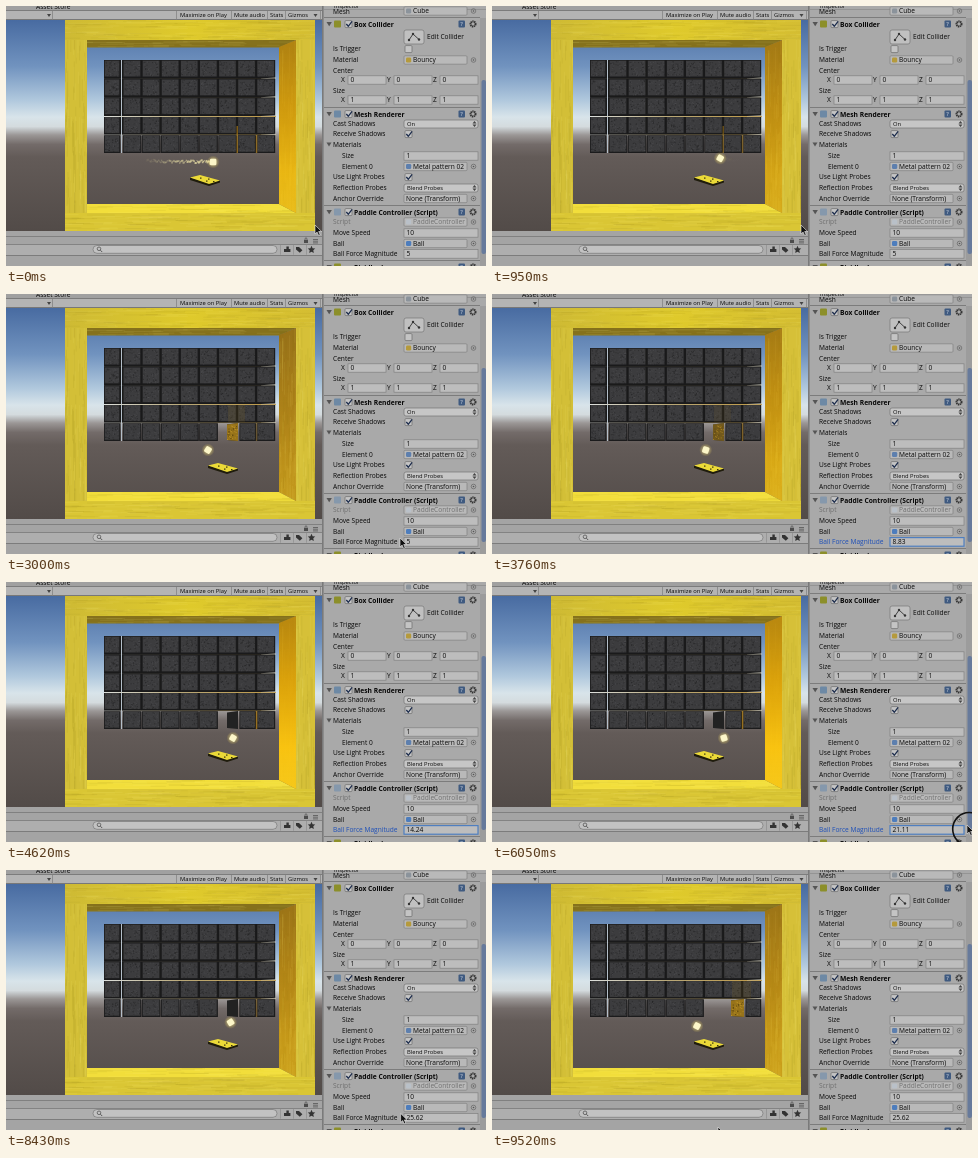
These frames come from a looping animation (480x260 px, 9.56 s). An HTML page with a canvas:

```html
<!DOCTYPE html>
<html lang="en">
<head>
<meta charset="utf-8">
<title>Brick game in the editor</title>
<style>
html, body { margin: 0; width: 100%; height: 100%; overflow: hidden; background: #a9a9a9; }
canvas, svg { position: absolute; left: 0; top: 0; width: 480px; height: 260px; }
text { font-family: "Open Sans", "Noto Sans", sans-serif; font-size: 6.6px; fill: #080808; white-space: pre; }
.bold { font-weight: 700; font-size: 6.7px; }
.bar { font-size: 5.8px; }
.dim { fill: #6f6f6f; }
.focus #label { fill: #1d4fb8; }
.focus #field { stroke: #4f7fc0; stroke-width: 1.2; }
</style>
</head>
<body>
<canvas id="game" width="480" height="260"></canvas>
<svg id="ui" viewBox="0 0 480 260"></svg>
<script>
const LOOP = 9560;
const ctx = document.getElementById('game').getContext('2d');
const ui = document.getElementById('ui');

let seed = 7;
const rnd = () => (seed = (seed * 16807) % 2147483647) / 2147483647;
const clamp = v => Math.max(0, Math.min(1, v));

// Linear value of column i in rows [time, ...values].
function track(keys, t, i = 1) {
  if (t <= keys[0][0]) return keys[0][i];
  for (let k = 1; k < keys.length; k++) {
    const a = keys[k - 1], b = keys[k];
    if (t <= b[0]) return a[i] + (b[i] - a[i]) * (t - a[0]) / (b[0] - a[0]);
  }
  return keys[keys.length - 1][i];
}

// ---- Motion ----
const BALL = [[-350, 140, 155], [0, 207, 156], [350, 262, 157], [800, 235, 153], [1200, 217, 151],
  [1500, 205, 158], [1860, 200, 156], [3000, 202, 156], [4620, 227, 156], [6050, 232, 156],
  [7570, 208, 156], [8300, 222, 153], [8700, 230, 151], [9100, 216, 157], [9520, 205, 156]];
const PADDLE = [[400, 199], [900, 217]];
const LIGHT = [[0, .8], [1860, .25], [3000, .2], [4620, 1], [6050, 1], [7570, .3], [9520, .35]];
const FORCE = [[3150, 5], [4620, 14.24], [6050, 21.11], [6900, 25.62]];
const CURSOR = [[2150, 309, 219], [2750, 394, 244], [3150, 394, 244], [3700, 484, 245], [5900, 484, 245],
  [6050, 475, 243], [7050, 465, 243], [7450, 250, 185], [8000, 250, 185], [8450, 401, 246],
  [9000, 300, 252], [9520, 226, 257]];
const HIT_1 = 1200, HIT_2 = 8700;

// ---- Game view ----
function poly(g, pts, fill) {
  g.beginPath();
  for (let i = 0; i < pts.length; i += 2) g.lineTo(pts[i], pts[i + 1]);
  g.closePath();
  g.fillStyle = fill;
  g.fill();
}

function layer(paint) {
  const c = document.createElement('canvas');
  c.width = 480;
  c.height = 260;
  paint(c.getContext('2d'));
  return c;
}

function blend(g, [x0, y0, x1, y1], stops) {
  const fill = g.createLinearGradient(x0, y0, x1, y1);
  stops.forEach(s => fill.addColorStop(...s));
  return fill;
}

function wood(g, pts, fill, upright) {
  g.save();
  poly(g, pts, fill);
  g.clip();
  const xs = pts.filter((v, i) => i % 2 === 0), ys = pts.filter((v, i) => i % 2);
  const x = Math.min(...xs), y = Math.min(...ys);
  const w = Math.max(...xs) - x, h = Math.max(...ys) - y;
  for (let i = 0; i < w * h / 35; i++) {
    g.fillStyle = rnd() < .5 ? 'rgba(120,95,0,.07)' : 'rgba(255,245,130,.09)';
    const len = 8 + rnd() * 32;
    g.fillRect(x + rnd() * w - (upright ? 0 : 10), y + rnd() * h - (upright ? 10 : 0),
      upright ? 1 : len, upright ? len : 1);
  }
  g.restore();
}

const INNER = [290, 34, 290, 207, 273, 198, 273, 41];
const scene = layer(g => {
  g.fillStyle = blend(g, [0, 14, 0, 225], [[0, '#486ba1'], [.22, '#7193bf'], [.38, '#b0c8dd'],
    [.46, '#d8e4ea'], [.505, '#d4dbde'], [.545, '#9b9796'], [.59, '#736b69'], [.65, '#635b58'], [1, '#524b48']]);
  g.fillRect(0, 14, 316, 211);
  wood(g, [78, 34, 290, 34, 273, 41.5, 81, 41.5], '#85711c');
  wood(g, INNER, blend(g, [0, 41, 0, 207], [[0, '#8f6c1c'], [.6, '#a57c1c'], [1, '#b88f1e']]), true);
  wood(g, [78, 207, 290, 207, 273, 198, 81, 198], '#f2de3b');
  wood(g, [59, 34, 81, 34, 81, 207, 59, 207], '#d3bf37', true);
  wood(g, [290, 34, 309, 34, 309, 207, 290, 207], '#d6c038', true);
  wood(g, [59, 14, 309, 14, 309, 34, 59, 34], blend(g, [59, 0, 309, 0],
    [[0, '#ceba34'], [.5, '#dfca2b'], [1, '#d4bd32']]));
  wood(g, [59, 207, 309, 207, 309, 225, 59, 225], '#dac634');
});

const glow = layer(g => poly(g, INNER, blend(g, [0, 41, 0, 207],
  [[0, 'rgba(205,150,10,.7)'], [.35, 'rgba(230,170,8,.85)'], [.75, 'rgba(252,198,16,.95)'], [1, 'rgba(252,205,25,.9)']])));

const colX = c => 98 + c * 19.1 - (c === 0 ? 0 : .3);
const rowY = r => 54 + r * 18.8;
function brick(g, x, y, w) {
  const h = 17.8;
  g.fillStyle = '#1b1b1c';
  g.fillRect(x, y, w, h);
  g.fillStyle = '#3c3c3e';
  g.fillRect(x + .8, y + .7, w - 2, h - 2);
  for (let i = 0; i < 55; i++) {
    g.fillStyle = rnd() < .5 ? 'rgba(95,95,98,.3)' : 'rgba(20,20,21,.35)';
    g.fillRect(x + 1 + rnd() * (w - 3), y + 1 + rnd() * (h - 3), 1, 1);
  }
}

const wall = layer(g => {
  g.fillStyle = '#1a1a1a';
  g.fillRect(98, 54, 171, 75);
  for (let r = 0; r < 5; r++)
    for (let c = 0; c < (r < 4 ? 9 : 6); c++) brick(g, colX(c), rowY(r), c ? 18.7 : 16.5);
  g.fillStyle = '#b4bfc9';
  g.fillRect(115, 54, 1, 93);
  g.fillStyle = blend(g, [98, 0, 270, 0], [[0, '#dcdfdc'], [.45, '#b9a878'], [1, '#c09a45']]);
  g.fillRect(98, 110, 172, 1);
  g.globalAlpha = .45;
  g.fillRect(98, 128.3, 172, .8);
  g.globalAlpha = .12;
  g.fillRect(98, 72, 172, .6);
  g.fillRect(98, 91, 172, .6);
  g.globalAlpha = .7;
  for (let r = 1; r < 5; r++)
    poly(g, [255, rowY(r) - .4, 270, rowY(r) - 1.5, 270, rowY(r) - .2, 255, rowY(r)], '#c5c3b8');
  g.globalAlpha = 1;
});

// Bottom row from column 6 on, with `gone` bricks knocked out.
const lastBricks = gone => layer(g => {
  seed = 91;
  for (let c = 6 + gone; c < 9; c++) {
    const cut = gone && c === 6 + gone ? gone + 1 : 0;
    brick(g, colX(c) + cut, rowY(4), 18.7 - cut);
  }
});
const rows = [0, 1, 2].map(lastBricks);

function drawFace(lit, x0, x1) {
  const side = [x0, 130.5, x1, 129, x1, 147, x0, 146];
  poly(ctx, side, '#222');
  ctx.globalAlpha = lit;
  poly(ctx, side, '#97731a');
  seed = 33;
  for (let i = 0; i < 40; i++) {
    ctx.fillStyle = rnd() < .5 ? '#5c450f' : '#b98f26';
    ctx.fillRect(x0 + rnd() * (x1 - x0 - 1), 131 + rnd() * 14, 1, 1);
  }
  ctx.globalAlpha = lit * .12;
  poly(ctx, [x0 + 1, 111, x1 + 7, 111, x1 + 7, 128, x0 + 1, 128], '#a57913');
  ctx.globalAlpha = 1;
}

function drawPaddle(x) {
  poly(ctx, [x - 15, 171.5, x - 15, 174, x + 4, 180, x + 15, 176.5, x + 15, 174.5, x + 4, 177], '#1f1c0c');
  poly(ctx, [x - 15, 171.5, x - 5, 169, x + 15, 174.5, x + 4, 178], '#ebda38');
  ctx.fillStyle = '#3b340c';
  [[-5, 171.5], [1, 174.5], [3, 172.5], [8, 175]].forEach(p => ctx.fillRect(x + p[0], p[1], 1.5, 1.2));
}

function drawBall(t) {
  const x = track(BALL, t), y = track(BALL, t, 2);
  const reach = Math.abs(x - track(BALL, t - 350));
  const trail = clamp((reach - 18) / 20);
  seed = 5;
  for (let i = 70; trail && i > 0; i--) {
    const past = t - i * 5, fade = 1 - i / 75;
    ctx.fillStyle = `rgba(250,240,175,${trail * fade * .75})`;
    const s = .8 + rnd() * 1.5;
    ctx.fillRect(track(BALL, past) - s / 2, track(BALL, past, 2) - s / 2 + (rnd() - .5) * 3.5, s, s);
  }
  const halo = ctx.createRadialGradient(x, y, 1, x, y, 6.5);
  halo.addColorStop(0, 'rgba(255,250,190,.9)');
  halo.addColorStop(.5, 'rgba(240,222,130,.4)');
  halo.addColorStop(1, 'rgba(230,200,80,0)');
  ctx.fillStyle = halo;
  ctx.fillRect(x - 7, y - 7, 14, 14);
  ctx.save();
  ctx.translate(x, y);
  ctx.rotate(t / 260);
  ctx.fillStyle = '#fcf6c8';
  ctx.beginPath();
  ctx.roundRect(-3.2, -3.2, 6.4, 6.4, 1.2);
  ctx.fill();
  ctx.restore();
}

function drawGame(t) {
  const ballX = track(BALL, t), light = track(LIGHT, t);
  const gone = t < HIT_1 ? 0 : t < HIT_2 ? 1 : 2;
  ctx.clearRect(0, 0, 480, 260);
  ctx.drawImage(scene, 0, 0);
  ctx.globalAlpha = light;
  ctx.drawImage(glow, 0, 0);
  ctx.globalAlpha = 1;
  ctx.drawImage(wall, 0, 0);
  ctx.drawImage(rows[gone], 0, 0);
  const lit = clamp((222 - ballX) / 12);
  if (gone === 1) drawFace(lit, 221, 232);
  if (gone === 2) drawFace(lit, 239, 252);
  ctx.fillStyle = `rgba(190,135,20,${.2 + light * .5})`;
  if (!gone) ctx.fillRect(230.5, 120, 1.5, 27);
  if (gone < 2) ctx.fillRect(249.8, 129, 1.5, 18);
  drawPaddle(track(PADDLE, t));
  drawBall(t);
}

// ---- Editor panels ----
const out = [];
const rect = (x, y, w, h, fill, more = '') =>
  out.push(`<rect x="${x}" y="${y}" width="${w}" height="${h}" fill="${fill}" ${more}/>`);
const path = (d, fill, more = '') => out.push(`<path d="${d}" fill="${fill}" ${more}/>`);
const text = (x, y, s, cls = '', more = '') => out.push(`<text x="${x}" y="${y}" class="${cls}" ${more}>${s}</text>`);
const dot = (x, y, r, fill, more = '') => out.push(`<circle cx="${x}" cy="${y}" r="${r}" fill="${fill}" ${more}/>`);
const thin = (c, w = .7) => `stroke="${c}" stroke-width="${w}"`;

const label = (y, s, x = 327) => text(x, y + 2.4, s);
function field(y, s, x = 398, w = 74) {
  rect(x, y - 4.2, w, 8.4, '#bdbdbd', thin('#808080'));
  text(x + 2.5, y + 2.4, s);
}
function check(x, y, on) {
  rect(x, y - 3.4, 7, 7, '#c4c4c4', 'rx="1" ' + thin('#6c6c6c'));
  if (on) path(`M${x + 1.3} ${y}l2 2.3 3.8-5`, 'none', thin('#1c2c4c', 1.3));
}
function objectField(y, s, icon, cls) {
  rect(398, y - 4.2, 63, 8.4, '#b9b9b9', 'rx="1" ' + thin('#808080'));
  if (icon) rect(400, y - 2.6, 5.2, 5.2, icon, 'rx="1.4"');
  text(icon ? 407 : 400, y + 2.4, s, cls, 'clip-path="url(#slot)"');
  dot(467.5, y, 2.3, 'none', thin('#666'));
  dot(467.5, y, .8, '#555');
}
function popup(y, s) {
  rect(398, y - 4, 74, 8, '#c6c6c6', 'rx="2" ' + thin('#757575'));
  text(401, y + 2.1, s, 'bar');
  path(`M466.5 ${y - .6}h4l-2-2.4zM466.5 ${y + .6}h4l-2 2.4z`, '#444');
}
function header(y, s, icon, boxed = true) {
  rect(318, y - 7, 156, 1, '#7c7c7c');
  path(`M320.5 ${y - 2}h5.4l-2.7 4.2z`, '#555');
  rect(328, y - 3.5, 7, 7, icon, 'rx="1"');
  if (boxed) check(339, y, true);
  text(348, y + 2.5, s, 'bold');
  rect(452.5, y - 3.5, 6.5, 7, '#3f5a80', 'rx="1"');
  text(454.2, y + 2.2, '?', 'bar', 'style="fill:#e4e8ee"');
  dot(467, y, 2.5, 'none', 'stroke="#333" stroke-width="2" stroke-dasharray="1.3 .5"');
}
function vector(y, n) {
  ['X', 'Y', 'Z'].forEach((axis, i) => {
    label(y, axis, 335 + i * 46);
    field(y, n, 342 + i * 46, 38);
  });
}

out.push('<defs><clipPath id="slot"><rect x="398" y="0" width="62.5" height="260"/></clipPath></defs>');

// Game tab and toolbar
rect(0, 0, 316, 5, '#a0a0a0');
text(30, 3, 'Asset Store');
rect(0, 5, 316, 9, '#b4b4b4');
rect(0, 4, 316, 1, '#7c7c7c');
rect(0, 13, 316, 1, '#787878');
[46, 170, 225, 261, 279, 314].forEach(x => rect(x, 5, .8, 8.5, '#858585'));
[[174, 'Maximize on Play'], [228, 'Mute audio'], [264, 'Stats'], [282, 'Gizmos']]
  .forEach(([x, s]) => text(x, 11.4, s, 'bar'));
path('M41 8h4l-2 3zM307.5 8h4l-2 3z', '#444');

// Project panel
rect(0, 225, 316, 35, '#a4a4a4');
rect(0, 230, 316, 1, '#808080');
rect(0, 239, 316, 10, '#aeaeae');
rect(0, 238, 316, 1, '#838383');
rect(0, 249, 316, 1, '#7c7c7c');
rect(298, 234, 4, 3, '#4c4c4c');
path('M299 234v-1.5q1-1.5 2 0v1.5', 'none', thin('#4c4c4c'));
path('M307 233.5h5M307 235.2h5M307 236.9h5', 'none', thin('#4c4c4c'));
rect(87, 239.5, 184, 7.8, '#c2c2c2', 'rx="3.9" ' + thin('#777'));
dot(93, 242.8, 1.8, 'none', thin('#555', .8));
path('M94.4 244.2l1.8 1.8', 'none', thin('#555', 1));
[274, 287, 300].forEach(x => rect(x, 238.5, .6, 10.2, '#888'));
path('M278 246v-3h2.4v-2.6h2.4v2.6h1.6v3z', '#333');
path('M290 241h3l3.4 3.2-2.6 2.6-3.8-3.4z', '#333');
path('M305.5 239.8l1.1 2.4 2.6.3-1.9 1.8.5 2.7-2.3-1.3-2.3 1.3.5-2.7-1.9-1.8 2.6-.3z', '#333');

// Inspector
rect(316, 0, 164, 260, '#a9a9a9');
rect(316, 0, 1.6, 260, '#7a7a7a');
text(328, 2.2, 'Inspector', 'bar');
rect(318, 3, 162, .6, '#888');
label(5.6, 'Mesh');
objectField(5, 'Cube', '#8b939b');

header(18, 'Box Collider', '#8c8f2a');
rect(398, 24, 20, 14, '#c0c0c0', 'rx="2" ' + thin('#777'));
path('M403 34l4-6 6 5.5', 'none', thin('#333', .9));
[[403, 34], [407, 28], [413, 33.5]].forEach(([x, y]) => dot(x, y, 1.2, '#333'));
label(31, 'Edit Collider', 421);
label(43, 'Is Trigger');
check(399, 43, false);
label(54, 'Material');
objectField(54, 'Bouncy', '#b59a3c');
label(64.5, 'Center');
vector(74, 0);
label(84.5, 'Size');
vector(94, 1);

header(108, 'Mesh Renderer', '#6d89a5');
label(118, 'Cast Shadows');
popup(118, 'On');
label(128, 'Receive Shadows');
check(399, 128, true);
path('M320.5 136.5h5l-2.5 4z', '#555');
label(138.5, 'Materials');
label(150, 'Size', 336);
field(150, 1);
label(160.5, 'Element 0', 336);
objectField(160.5, 'Metal pattern 02', '#5d7fae');
label(171, 'Use Light Probes');
check(399, 171, true);
label(182, 'Reflection Probes');
popup(182, 'Blend Probes');
label(192.5, 'Anchor Override');
objectField(192.5, 'None (Transform)');

header(206, 'Paddle Controller (Script)', '#8598ac');
text(327, 218.4, 'Script', 'dim');
objectField(216, 'PaddleController', '#b9c0c8', 'dim');
label(227, 'Move Speed');
field(227, 10);
label(237.5, 'Ball');
objectField(237.5, 'Ball', '#4d7dbd');
text(327, 250.4, 'Ball Force Magnitude', '', 'id="label"');
rect(398, 243.6, 74, 8.6, '#bdbdbd', 'id="field" ' + thin('#808080'));
text(400.5, 250.4, '5', '', 'id="force"');
header(261, 'Rigidbody', '#8c8f2a', false);
rect(474, 12, 6, 248, '#9c9c9c');
rect(475.5, 74, 4.5, 174, '#677a9b', 'rx="2"');

out.push('<g id="cursor"><circle id="ring" cx="2.2" cy="4" r="16.5" fill="none" stroke="#111" stroke-width="1.6"/>' +
  '<path d="M0 0v9l2.1-1.9 1.5 3.3 1.6-.7-1.5-3.2h2.9z" fill="#111" stroke="#eee" stroke-width=".6"/></g>');
ui.innerHTML = out.join('');

const [force, cursor, ring] = ['force', 'cursor', 'ring'].map(id => document.getElementById(id));

function drawUi(t) {
  force.textContent = +track(FORCE, Math.floor(t / 10) * 10).toFixed(2);
  ui.classList.toggle('focus', t >= 3150 && t < 7300);
  cursor.setAttribute('transform', `translate(${track(CURSOR, t)} ${track(CURSOR, t, 2)})`);
  ring.setAttribute('visibility', t >= 5900 && t < 6900 ? 'visible' : 'hidden');
}

const start = performance.now();
function tick() {
  const t = (performance.now() - start) % LOOP;
  drawGame(t);
  drawUi(t);
  requestAnimationFrame(tick);
}
tick();
</script>
</body>
</html>
```
